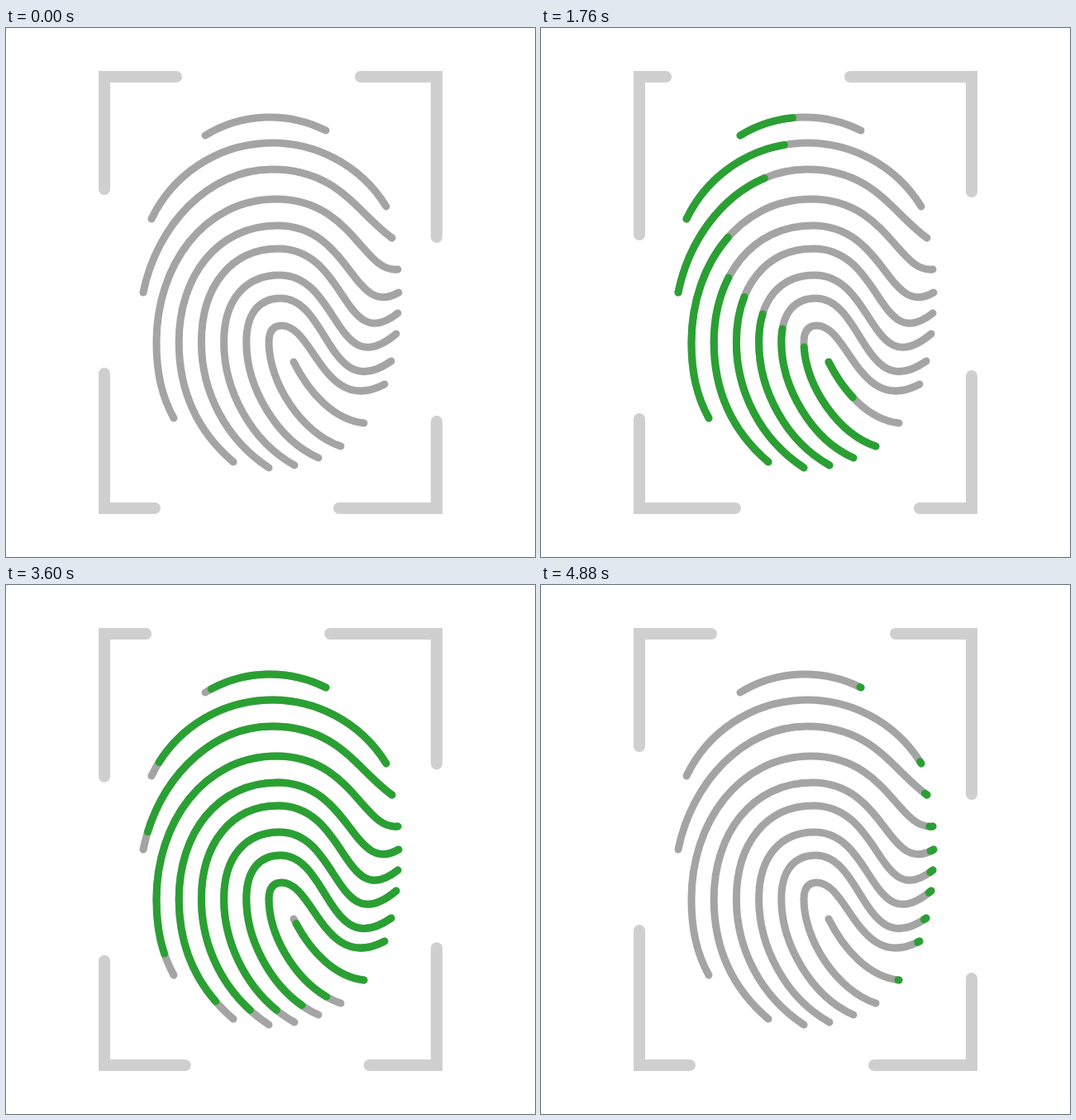
Recreate the animation shown at these times as an HTML page with a canvas. Size 640x640 px, loop 4.96 s.

```html
<!DOCTYPE html>
<html lang="en">
<head>
<meta charset="utf-8">
<title>Fingerprint scan</title>
<style>
  html, body { margin: 0; width: 100%; height: 100%; overflow: hidden; background: #fff; }
  canvas { display: block; width: 640px; height: 640px; }
</style>
</head>
<body>
<canvas id="stage" width="640" height="640"></canvas>
<script>
const ctx = document.getElementById('stage').getContext('2d');
const LOOP = 4960, STEP = 80;
const FRAME = '#cfcfcf', RIDGE = '#a3a4a3', SCAN = '#2aa033';

const mix = (a, b, k) => a + (b - a) * k;

// Nested ridge number i: rises to a vertical tangent on the left, turns over
// a flat top and dips to the right. Only its ends and its height are given.
function whorl(start, topY, end, i) {
  const [x0, y0] = start;
  const leftX = 182 + 27.2 * i, leftY = 380;
  const topX = 327 + 1.3 * i;
  const rise = [
    mix(leftX, x0, 0.28 + 0.035 * i), mix(leftY, y0, 0.7 + 0.035 * i),
    leftX, mix(leftY, y0, 0.39), leftX, leftY
  ];
  const turn = [
    leftX, mix(leftY, topY, 0.53 + 0.035 * i),
    mix(topX, leftX, 0.61), topY, topX, topY
  ];
  const dip = [
    topX + 92 - 2.1 * i * i, topY,
    432 - 13.5 * i + 0.8 * i * i, 297 + 60.5 * i - 5.2 * i * i, ...end
  ];
  return `M${start}C${rise}C${turn}C${dip}`;
}

function makeRidge(d) {
  const el = document.createElementNS('http://www.w3.org/2000/svg', 'path');
  el.setAttribute('d', d);
  return { path: new Path2D(d), length: el.getTotalLength() };
}

const ridges = [
  'M241 130A150 150 0 0 1 387 124',
  'M176 231A162 162 0 0 1 460 216',
  'M166 320C182 240 244 171 322 171C402 171 425 224 467 254',
  whorl([203, 472], 207, [474, 292], 0),
  whorl([275, 525], 239, [475, 320], 1),
  whorl([318, 532], 267, [474, 345], 2),
  whorl([349, 529], 299, [472, 370], 3),
  whorl([378, 520], 327, [466, 403], 4),
  whorl([405, 506], 360, [458, 431], 5),
  'M348 404C367 442 397 474 433 478'
].map(makeRidge);

// Smooth 0..1 progress between two times.
function ease(t, from, to) {
  const x = Math.min(1, Math.max(0, (t - from) / (to - from)));
  return x * x * (3 - 2 * x);
}

function corner(...points) {
  ctx.beginPath();
  points.forEach(([x, y]) => ctx.lineTo(x, y));
  ctx.stroke();
}

// The four corners slide along the rectangle and back.
function drawBrackets(t) {
  const s = 67.8 * (ease(t, 0, 2440) - ease(t, 2440, 4900));
  const left = 119, right = 521, top = 59, bottom = 581;
  ctx.strokeStyle = FRAME;
  ctx.lineWidth = 14;
  corner([206 - s, top], [left, top], [left, 195 + s]);
  corner([429 - s, top], [right, top], [right, 253 - s]);
  corner([right, 476 - s], [right, bottom], [403 + s, bottom]);
  corner([left, 418 + s], [left, bottom], [180 + s, bottom]);
}

// Green fills each ridge from its start, then drains from the same side.
function drawRidges(t) {
  const head = ease(t, 590, 3120);
  const tail = ease(t, 3375, 4965);
  ctx.lineWidth = 9;
  for (const { path, length } of ridges) {
    ctx.strokeStyle = RIDGE;
    ctx.stroke(path);
    if (head <= tail) continue;
    ctx.strokeStyle = SCAN;
    ctx.setLineDash([length * (head - tail) + (head === 1 ? 1 : 0), length * 2]);
    ctx.lineDashOffset = -length * tail;
    ctx.stroke(path);
    ctx.setLineDash([]);
  }
}

function draw(now) {
  const t = Math.floor((now % LOOP) / STEP) * STEP;
  ctx.fillStyle = '#fff';
  ctx.fillRect(0, 0, 640, 640);
  ctx.lineCap = 'round';
  drawBrackets(t);
  drawRidges(t);
}

let origin;
function tick(now) {
  origin ??= now;
  draw(Math.max(0, now - origin));
  requestAnimationFrame(tick);
}
draw(0);
requestAnimationFrame(tick);
</script>
</body>
</html>
```
